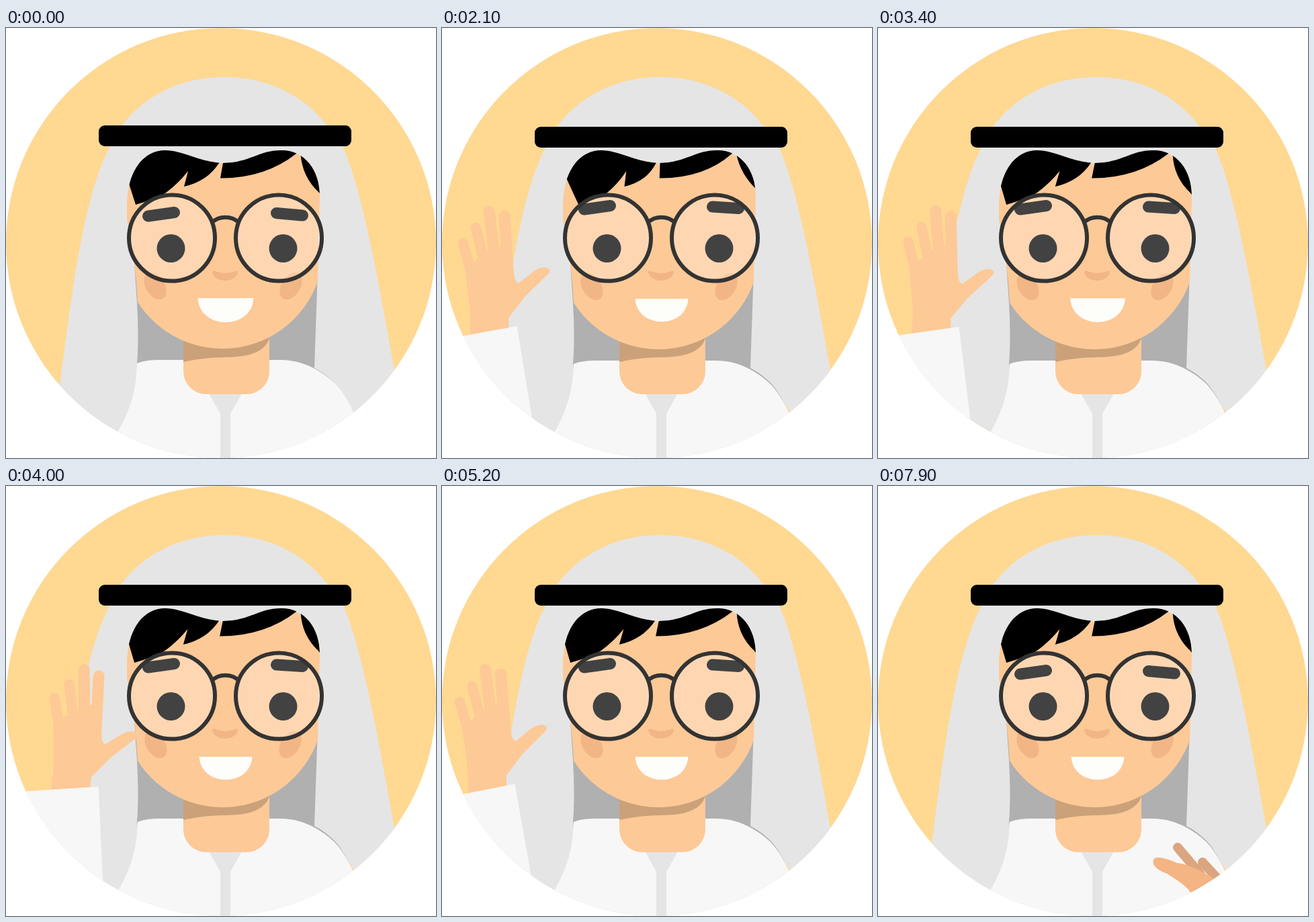
An HTML page that plays this animation: 640 by 640 pixels, repeating every 8 s.

```html
<!DOCTYPE html>
<html lang="en">
<head>
<meta charset="utf-8">
<title>Waving avatar</title>
<style>
  html, body { margin: 0; width: 100%; height: 100%; overflow: hidden; background: #fff; }
  svg { display: block; width: 100vw; height: 100vh; }
  .skin { fill: #fdc997; }
  .cloth { fill: #e5e5e5; }
  .robe { fill: #f7f7f7; }
  .blush { fill: #f2b686; }
  .brow { stroke: #000; stroke-width: 17; stroke-linecap: round; }
  .fingers { fill: none; stroke: #fdc997; stroke-linecap: round; }
  .tips { fill: none; stroke: #dba57f; stroke-width: 14; stroke-linecap: round; }
</style>
</head>
<body>
<svg viewBox="0 0 640 640">
  <defs>
    <clipPath id="disc"><circle cx="320" cy="320" r="320"/></clipPath>
    <path id="faceShape" d="M180 262C181 212 205 182 237 182C262 182 290 200 323 201C365 200 375 182 410 182C445 182 467 212 467 250L464 377A150 150 0 0 1 196 408Q193 345 180 285Z"/>
    <clipPath id="faceClip"><use href="#faceShape"/></clipPath>
    <ellipse id="cheek" class="blush" rx="14" ry="22"/>
    <circle id="eye" r="21"/>
    <circle id="lens" cy="312.500" r="64"/>
  </defs>

  <g clip-path="url(#disc)">
    <rect width="640" height="640" fill="#ffd892"/>

    <path id="drape" class="cloth" d="M79 538C98 400 113 255 155 176L171 147C208 97 265 73 325 73C385 73 442 97 479 147L501 176C530 240 555 380 578 509V640H79Z"/>
    <path fill="#b0b0b0" d="M191 350L195 410C197 450 197 470 195 500L200 540L400 600L510 560Q500 540 490 529Q475 514 459 506L464 360Z"/>
    <path fill="#ffd892" d="M510 559L518 572L500 575Z"/>

    <path id="robe" class="robe" d="M195 499Q207 494 228 494H408Q452 494 490 529Q505 545 517 571L540 650H135L167 600C187 565 194 535 195 499Z"/>
    <path class="cloth" d="M302 544H351L334 574V640H319V574Z"/>
    <path class="skin" d="M264 440H392V511A34 34 0 0 1 358 545H298A34 34 0 0 1 264 511Z"/>
    <path fill="#cba179" d="M264 440H392V462Q383 490 328 490Q296 490 264 497Z"/>

    <use id="face" href="#faceShape" class="skin"/>
    <g clip-path="url(#faceClip)">
      <g id="hair">
        <path d="M177 213L200 172H237L327 185L317 201Q300 228 265 236L271 213Q256 232 237 246Q215 257 193 263Z"/>
        <path d="M326 184L400 170L440 180L432 187Q385 224 319 223.500Z"/>
        <path d="M438 180L480 190V262L466 245Q441 222 438.500 188Z"/>
      </g>
    </g>

    <use id="cheekL" href="#cheek"/>
    <use id="cheekR" href="#cheek"/>
    <path class="blush" d="M307 364Q307 360 312 362Q326 368 340 362Q345 360 345 364C341 380 311 380 307 364Z"/>
    <path id="mouth" fill="#fdfdfa" d="M285.500 402H368.500C366 450 288 450 285.500 402Z"/>

    <use id="eyeL" href="#eye"/>
    <use id="eyeR" href="#eye"/>
    <path id="browL" class="brow" d="M211.500 280L250.500 274.500"/>
    <path id="browR" class="brow" d="M402.500 275.500L441.500 279"/>

    <g fill="#fff" fill-opacity=".26" stroke="#333" stroke-width="6">
      <use href="#lens" x="247"/>
      <use href="#lens" x="406"/>
      <path fill="none" d="M306 290C317 279 336 279 347 290"/>
    </g>

    <rect id="band" x="138" y="145" width="376" height="31" rx="9"/>

    <g id="arm">
      <path class="skin" d="M60 475Q69 430 68 405L67 355L104 330L125 325L138 350L139 375Q140 382 144 384L166 370Q178 362 188 365Q195 368 190 374L152 404L124 433L120 475Z"/>
      <g class="fingers">
        <path stroke-width="15" d="M68 316L78 375M89.500 295L98 360"/>
        <path stroke-width="17" d="M111.500 273L113 360M133.500 282.500L130 370"/>
      </g>
      <path class="robe" d="M-90 464L135 447L143 587L160 900H-90Z"/>
    </g>

    <g id="hand">
      <path class="tips" d="M446 538L480 578M483 560L520 600"/>
      <path fill="#f4b483" d="M410 562Q407 552 420 553Q432 555 445 561Q470 564 505 588L540 620L485 640L465 605Q460 595 430 577Q412 570 410 562Z"/>
    </g>
  </g>
</svg>

<script>
const LOOP = 8000, STEP = 100;
const { sin, PI, min, max, floor } = Math;

const part = (t, from, to) => max(0, min(1, (t - from) / (to - from)));
// ramp goes from 0 to 1 and stays; bump goes from 0 to 1 and back.
const ramp = (t, from, to) => { const u = part(t, from, to); return u * u * (3 - 2 * u); };
const bump = (t, from, to) => sin(PI * part(t, from, to));

const move = (id, value) => document.getElementById(id).setAttribute("transform", value);
const scaleAt = (x, y, sx, sy = sx) =>
  `translate(${x} ${y}) scale(${sx} ${sy}) translate(${-x} ${-y})`;

function drawBody(t) {
  const settle = ramp(t, 0, 900);
  const hair = 9.5 * bump(t, 1500, 2700) - 1.5 * settle;
  const smile = 1 - settle + bump(t, 2800, 3600) + bump(t, 6800, 7600);

  move("band", `translate(0 ${2 * settle - 36 * bump(t, 0, 900)})`);
  move("drape", scaleAt(327, 73, 1 + .004 * bump(t, 0, 900), 1));
  move("robe", scaleAt(327, 640, 1 - .007 * settle));
  move("face", `translate(0 ${settle})`);
  move("hair", `translate(0 190) skewX(${hair}) translate(0 -190)`);
  move("mouth", scaleAt(327, 420, .95 + .05 * smile));
  for (const [id, side] of [["cheekL", -1], ["cheekR", 1]])
    move(id, `translate(${323 + side * (101 - settle)} ${384 + settle}) rotate(${32 * side})`);
}

function drawLook(t) {
  const raised = ramp(t, 1500, 1900) - ramp(t, 5700, 6100);
  const tilt = 8 * bump(t, 1000, 1800) - 1.5 * raised + 7 * bump(t, 6500, 7500);
  const open = 1 - .9 * bump(t, 6900, 7300);

  move("browL", `translate(0 ${-10 * raised})`);
  move("browR", `translate(0 ${-10 * raised}) rotate(${tilt} 422 277)`);
  for (const [id, side] of [["eyeL", -1], ["eyeR", 1]])
    move(id, `translate(${329 + side * 83.5} 328) scale(1 ${open})`);
}

function drawArms(t) {
  const wave = .65 + 8.5 * sin(2 * PI * (min(t, 5300) - 418) / 1023.6);
  const drop = 1 - ramp(t, 1300, 1850) + ramp(t, 5600, 6150);
  const away = 1 - ramp(t, 7600, 7900);

  move("arm", `translate(0 ${420 * drop}) rotate(${wave} 92 668)`);
  move("hand", `translate(${130 * away} ${110 * away})`);
}

const start = performance.now();
function tick() {
  const now = (performance.now() - start) % LOOP;
  const t = floor(now / STEP) * STEP;
  drawBody(t);
  drawLook(t);
  drawArms(t);
  requestAnimationFrame(tick);
}
tick();
</script>
</body>
</html>
```
